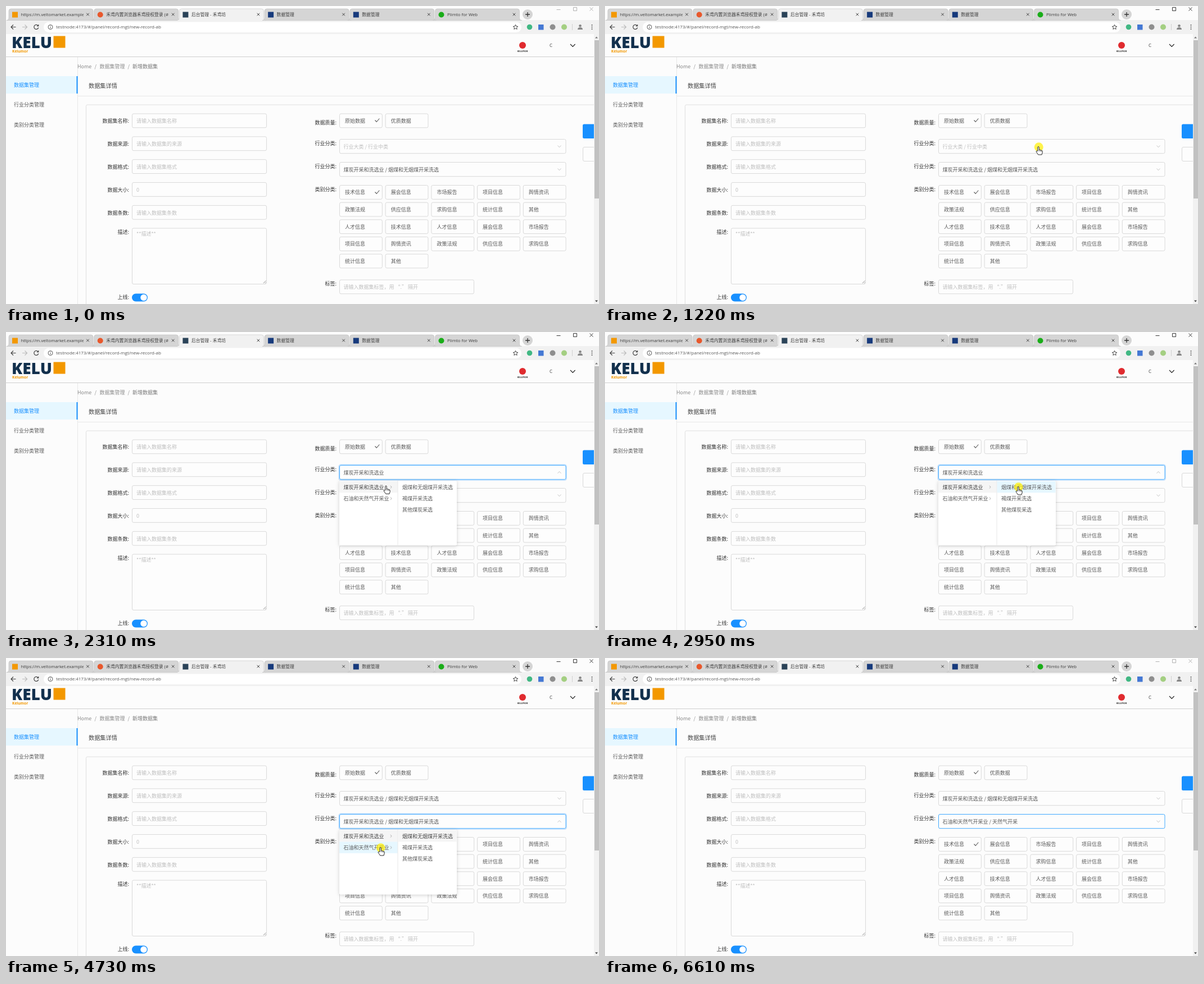
These frames come from a looping animation (1055 by 531 pixels, 6640 ms). An HTML page:

```html
<!DOCTYPE html>
<html lang="zh-CN">
<head>
<meta charset="utf-8">
<title>新增数据集</title>
<style>
html, body { margin: 0; width: 100%; height: 100%; overflow: hidden; background: #fcfcfc; }
svg { display: block; width: 1055px; height: 531px; }
text { font-family: "Noto Sans CJK SC", "Noto Sans", sans-serif; white-space: pre; }
.ui { font-family: "Open Sans", "Noto Sans CJK SC", sans-serif; }
.menu { filter: drop-shadow(0 1px 3px rgba(0,0,0,.18)); }
</style>
</head>
<body>
<svg id="stage" viewBox="0 0 1055 531" xmlns="http://www.w3.org/2000/svg">
  <g id="page"></g>
  <g id="live"></g>
</svg>
<script>
const LOOP = 6640;
const BLUE = '#1890ff', FOCUS = '#40a9ff', INK = '#595959', HINT = '#bfbfbf', LINE = '#d9d9d9';
const COAL = '煤炭开采和洗选业', OIL = '石油和天然气开采业';
const COAL_KINDS = ['烟煤和无烟煤开采洗选', '褐煤开采洗选', '其他煤炭采选'];
const OIL_KINDS = ['石油开采', '天然气开采'];

// y is the vertical middle of the text
const text = (s, x, y, fill = INK, size = 9, more = '') =>
  `<text x="${x}" y="${y + size * 0.37}" font-size="${size}" fill="${fill}" ${more}>${s}</text>`;
const rect = (x, y, w, h, fill, more = '') =>
  `<rect x="${x}" y="${y}" width="${w}" height="${h}" fill="${fill}" ${more}/>`;
const box = (x, y, w, h, stroke = LINE) =>
  rect(x, y, w, h, '#fdfdfd', `stroke="${stroke}" rx="2.5"`);
const disc = (x, y, r, fill) => `<circle cx="${x}" cy="${y}" r="${r}" fill="${fill}"/>`;
const line = (d, stroke, w = 1) =>
  `<path d="${d}" fill="none" stroke="${stroke}" stroke-width="${w}"/>`;

function browser() {
  let s = rect(0, 0, 1055, 26, '#fcfcfc') + rect(0, 25, 1055, 25, '#f1f1f1');
  const tabs = [
    ['https://m.veltomarket.example/ind', '#f39800', 0],
    ['禾鸢内置浏览器禾鸢授权登录 (#1', '#e8582c', 1],
    ['后台管理 - 禾鸢坊', '#2b4358', 0],
    ['数据管理', '#173a7c', 0],
    ['数据管理', '#173a7c', 0],
    ['Plimto for Web', '#1aad19', 1]
  ];
  tabs.forEach(([name, color, round], i) => {
    const x = 4 + i * 151.7, on = i === 2;
    s += `<path d="M${x - 3} 25.5q4 0 4-5V9q0-4 4-4h142q4 0 4 4v11.500q0 5 4 5z"
      fill="${on ? '#f1f1f1' : '#d5d5d5'}" stroke="${on ? '#c4c4c4' : '#bdbdbd'}" stroke-width=".6"/>`;
    if (on) s += rect(x - 2, 25, 156, 1.5, '#f1f1f1');
    s += round ? disc(x + 12, 15.5, 5, color) : rect(x + 7, 10.5, 10, 10, color);
    s += `<clipPath id="tab${i}">${rect(x + 20, 5, 114, 20, '#000')}</clipPath>`;
    s += text(name, x + 22.5, 15, '#3c3c3c', 7.8, `class="ui" clip-path="url(#tab${i})"`);
    const c = x + 141.5;
    s += line(`M${c - 2.3} 12.700l4.600 4.600m0-4.600l-4.600 4.600`, '#444');
  });
  s += disc(928, 15, 9, '#d5d5d5') + line('M924 15h8M928 11v8', '#333', 1.3);
  s += rect(67, 28.5, 850, 18.5, '#fff', 'rx="9.2"');
  s += line('M17.500 37.500H9m4-4l-4 4 4 4', '#444', 1.2);
  s += line('M29 37.500h8.500m-4-4l4 4-4 4', '#bbb', 1.2);
  s += line('M57 35a4 4 0 1 0 .7 3.500M57.700 33v2.700H55', '#444', 1.2);
  s += `<circle cx="79" cy="37.500" r="4" fill="none" stroke="#555"/>` + line('M79 37v2.700M79 35v1', '#555');
  s += text('testnode:4173/#/panel/record-mgt/new-record-ab', 89, 37.5, '#555', 8, 'class="ui"');
  s += line('M906.500 33.300l1.300 2.800 3 .3-2.300 2 .7 3-2.700-1.600-2.700 1.600.7-3-2.300-2 3-.3z', '#444');
  s += disc(931.5, 37.5, 4.8, '#41b883') + rect(947, 33, 9.5, 9.5, '#4478d4');
  s += disc(972.5, 37.5, 5, '#8e8e8e') + disc(993, 37.5, 5, '#a4cf82');
  s += line('M1007.500 32v11', '#d0d0d0') + disc(1021.5, 35.3, 2.3, '#888') +
    `<path d="M1017 42q0-4 4.500-4t4.500 4z" fill="#888"/>`;
  for (const y of [34, 37.5, 41]) s += disc(1042.5, y, 1, '#555');
  return s;
}

function frame() {
  let s = rect(0, 50, 1046, 481, '#fcfcfc') + line('M0 90.500H1046', '#cfcfcf');
  s += text('KELU', 10, 65, '#12304d', 28, 'class="ui" font-weight="800"');
  s += rect(84.5, 53.5, 21, 21, '#f39800');
  s += text('Kelumor', 11, 81, '#f39800', 6.6, 'class="ui" font-weight="700"');
  s += disc(919, 70, 6, '#e02b2f') + text('KELUMOR', 919, 80.5, '#222', 3.8, 'text-anchor="middle" font-weight="700"');
  s += text('C', 967, 70, '#444', 8) + line('M1004 68l4.300 4.300 4.300-4.300', '#222', 1.2);

  s += line('M127.500 91V531', '#e8e8e8') + rect(0, 125, 127, 31, '#e6f7ff') + rect(125.5, 125, 2, 31, BLUE);
  s += text('数据集管理', 14, 140.5, BLUE) + text('行业分类管理', 14, 176) + text('类别分类管理', 14, 212);
  s += text('Home', 127, 108, '#8c8c8c') + text('/', 157.5, 108, '#8c8c8c') + text('数据集管理', 166.5, 108, '#8c8c8c') +
    text('/', 216.5, 108, '#8c8c8c') + text('新增数据集', 225, 108, '#777');
  s += text('数据集详情', 147, 142.5, '#444', 10.2) + line('M128 160.500H1046', '#e8e8e8');
  s += line('M142.500 531V178.500q0-2.500 2.500-2.500H1046', '#e0e0e0');
  s += rect(1026, 210.5, 24, 25.5, BLUE, 'rx="2.500"') + box(1026.5, 251.5, 24, 25);

  s += rect(1046, 50, 9, 481, '#f1f1f1') + rect(1047, 61, 8, 282, '#c1c1c1');
  s += '<path d="M1048 57.500l2.500-3 2.500 3z" fill="#777"/><path d="M1048 524.500l2.500 3 2.500-3z" fill="#444"/>';
  return s;
}

const label = (s, x, y) => text(s + ':', x, y, '#333', 9, 'text-anchor="end" font-weight="500"');
const tick = y => line(`M656.500 ${y}l2.800 3 5-6`, INK, 1.1);
const chip = (s, col, y) => {
  const x = 593.5 + col * 81.7;
  return box(x, y, 75.8, 24.8) + text(s, x + 9.5, y + 12.4);
};

function form() {
  let s = '';
  const rows = [['数据集名称', '请输入数据集名称'], ['数据来源', '请输入数据集的来源'],
    ['数据格式', '请输入数据集格式'], ['数据大小', '0'], ['数据条数', '请输入数据集条数']];
  rows.forEach(([name, hint], i) => {
    const y = 192 + i * 40.85;
    s += label(name, 219, y + 13) + box(224.5, y, 239, 24.8) + text(hint, 232, y + 13, HINT);
  });
  s += label('描述', 219, 403) + box(224.5, 396, 239, 99.5) + text('**描述**', 232, 406, HINT);
  s += line('M458 494l4.500-4.500M461 494l1.500-1.500', '#777', .8);
  s += label('上线', 219, 519) + rect(224, 512.5, 28, 14, BLUE, 'rx="7"') + disc(245, 519.5, 5.7, '#fff');

  s += label('数据质量', 588, 207.5) + chip('原始数据', 0, 192) + chip('优质数据', 1, 192) + tick(203.5);
  s += label('行业分类', 588, 245) + label('行业分类', 588, 286) + label('类别分类', 588, 326.5);
  const kinds = ['技术信息', '展会信息', '市场报告', '项目信息', '舆情资讯', '政策法规', '供应信息', '求购信息',
    '统计信息', '其他', '人才信息'];
  const order = [...kinds, kinds[0], kinds[10], ...kinds.slice(1, 10).filter(k => k !== '其他')];
  // second pass of the list runs in its own order
  const tail = [1, 2, 3, 4, 5, 6, 7, 8, 9].map(i => kinds[i]);
  [...order.slice(0, 13), ...tail].forEach((k, i) => {
    s += chip(k, i % 5, 319.5 + Math.floor(i / 5) * 30.65);
  });
  s += tick(331.5);
  s += label('标签', 588, 495) + box(593.5, 488, 239, 24.8) + text('请输入数据集标签，用 “.” 隔开', 600.5, 501, HINT);
  return s;
}

// time, x, y of the pointer tip
const path = [
  [60, 990, 531], [700, 792, 316], [1100, 771, 251], [1840, 771, 251], [2120, 676, 274.5], [2500, 676, 274.5],
  [2860, 735, 276], [3040, 735, 276], [3380, 676, 291.5], [3590, 676, 291.5], [3880, 667, 320], [4560, 667, 320],
  [4680, 666, 338], [4860, 666, 338], [5080, 737, 332], [5360, 737, 332], [5670, 899, 370.5], [5950, 978, 455],
  [6330, 997, 533]
];
const clicks = [1180, 2150, 2880, 3390, 4660, 5240];
const clamp = v => Math.max(0, Math.min(1, v));
const ramp = (t, from, len) => clamp((t - from) / len);

function pointer(t) {
  if (t < 60 || t > 6330) return null;
  const i = path.findIndex(p => p[0] >= t), b = path[i], a = path[Math.max(0, i - 1)];
  const u = b === a ? 0 : (t - a[0]) / (b[0] - a[0]), k = u * u * (3 - 2 * u);
  return { x: a[1] + (b[1] - a[1]) * k, y: a[2] + (b[2] - a[2]) * k };
}

const inside = (p, x, y, w, h) => p && p.x >= x && p.x < x + w && p.y >= y && p.y < y + h;

// 0 closed, 1 open
function openness(t, from, to) {
  if (t < to) return 1 - (1 - ramp(t, from, 210)) ** 5;
  return 1 - ramp(t, to, 200) ** 3;
}

function field(y, value, hint, focus, glow, open, clear) {
  let s = focus && glow ? rect(592.2, y - 1.3, 405, 28, 'none', 'rx="3.500" stroke="#1890ff" stroke-opacity=".25" stroke-width="1.600"') : '';
  s += box(593.5, y, 402.5, 25.2, focus ? FOCUS : LINE) + text(value || hint, 600.5, y + 13, value ? INK : HINT);
  const k = 1.6 * (1 - 2 * open), c = y + 12.7;
  if (clear) return s + disc(984.5, c, 3.8, '#a6a6a6') + line(`M983 ${c - 1.5}l3 3m0-3l-3 3`, '#fff', .9);
  return s + line(`M981.500 ${c - k}L984.500 ${c + k}L987.500 ${c - k}`, HINT, .9);
}

function menu(top, open, p, picked, kinds, pickedKind) {
  if (open <= 0) return '';
  const w = kinds ? 209 : 104;
  let s = rect(593, 0, w, 115.5, '#fff', 'rx="2.500"');
  const item = (name, col, i, sel) => {
    const x = 593 + col * 104.5, y = 1 + i * 20.4;
    const hover = inside(p, x, top + y, 104, 20.4);
    if (sel || hover) s += rect(x, y, 104, 20.4, sel ? '#f5f5f5' : '#e6f7ff');
    s += text(name, x + 7.5, y + 10.2, sel ? '#444' : INK, 9, sel ? 'font-weight="500"' : '');
    if (!col) s += line(`M683.800 ${y + 8}l2.400 2.300-2.400 2.300`, '#999', .8);
  };
  [COAL, OIL].forEach((n, i) => item(n, 0, i, n === picked));
  if (kinds) {
    s += line('M697 0V115.500', '#e8e8e8');
    kinds.forEach((n, i) => item(n, 1, i, n === pickedKind));
  }
  return `<g class="menu" opacity="${open}" transform="translate(0 ${top}) scale(1 ${.8 + .2 * open})">${s}</g>`;
}

function tip(s, x, y, alpha) {
  if (alpha <= 0) return '';
  return `<g opacity="${alpha}">${rect(x + .5, y + .5, s.length * 9 + 5, 12.5, '#fff', 'stroke="#aaa"')}${text(s, x + 3.5, y + 6.8, '#666')}</g>`;
}

const HAND = 'M-1.200 7.500V.8a1.200 1.200 0 0 1 2.400 0V5l1.200.1a1 1 0 0 1 1 .5l1.300.2a1 1 0 0 1 .8.5l.8.2q.9.3.9 1.300V10l-1.200 4H-.3L-3.800 8.600q-.4-1.200.8-1.300z';
const ARROW = 'M0 0v11l2.500-2.300 1.800 4 1.700-.8-1.800-3.800h3.400z';

function draw(t) {
  const p = pointer(t);
  const open1 = openness(t, 1370, 2970), open2 = openness(t, 3475, 5320);
  const value1 = t < 2270 ? '' : t < 2970 ? COAL : COAL + ' / ' + COAL_KINDS[0];
  const oil = t >= 4790;
  const value2 = !oil ? COAL + ' / ' + COAL_KINDS[0] : t < 5320 ? OIL : OIL + ' / ' + OIL_KINDS[1];
  const over1 = inside(p, 593, 237, 403, 26), over2 = inside(p, 593, 278, 403, 26) && open1 <= 0;

  let s = field(237.5, value1, '行业大类 / 行业中类', t >= 1300 && t < 3460, true, open1, false);
  s += field(278.5, value2, '', t >= 3460, t < 6560, open2, over2 && t < 4000);
  s += menu(265, open1, p, t < 2270 ? '' : COAL, t < 2270 ? null : COAL_KINDS, t < 2970 ? '' : COAL_KINDS[0]);
  s += menu(306, open2, p, oil ? OIL : COAL, oil ? OIL_KINDS : COAL_KINDS, oil ? (t < 5320 ? '' : OIL_KINDS[1]) : COAL_KINDS[0]);
  s += tip(COAL, 661, 340, ramp(t, 4330, 150) - ramp(t, 4580, 100));
  s += tip(OIL_KINDS[1], 733, 345, ramp(t, 5220, 120) - ramp(t, 5440, 290));

  const ink = t >= 1130 && t < 6560 ? '#222' : '#aaa';
  s += line('M979.500 6.500h7M1009.500 2.500h6v6h-6zM1038.500 2.500l6 6m0-6l-6 6', ink, .9);

  if (p) {
    if (clicks.some(c => t >= c && t < c + 130))
      s += `<circle cx="${p.x + .7}" cy="${p.y + .3}" r="8" fill="#ffee00" opacity=".7"/>`;
    const hand = over1 || over2 ||
      (open1 > 0 && inside(p, 593, 263, 209, 117)) || (open2 > 0 && inside(p, 593, 304, 209, 117));
    s += `<path d="${hand ? HAND : ARROW}" transform="translate(${p.x} ${p.y})" fill="#fff" stroke="#111" stroke-width=".9" stroke-linejoin="round"/>`;
    if (hand) s += `<g transform="translate(${p.x} ${p.y})">${line('M1.200 5v3M3.500 5.800v2.500M5.500 6.500v2', '#111', .7)}</g>`;
  }
  document.getElementById('live').innerHTML = s;
}

document.getElementById('page').innerHTML = browser() + frame() + form();
const start = performance.now();
function tickFrame(now) {
  draw(Math.max(0, now - start) % LOOP);
  requestAnimationFrame(tickFrame);
}
draw(0);
requestAnimationFrame(tickFrame);
</script>
</body>
</html>
```
